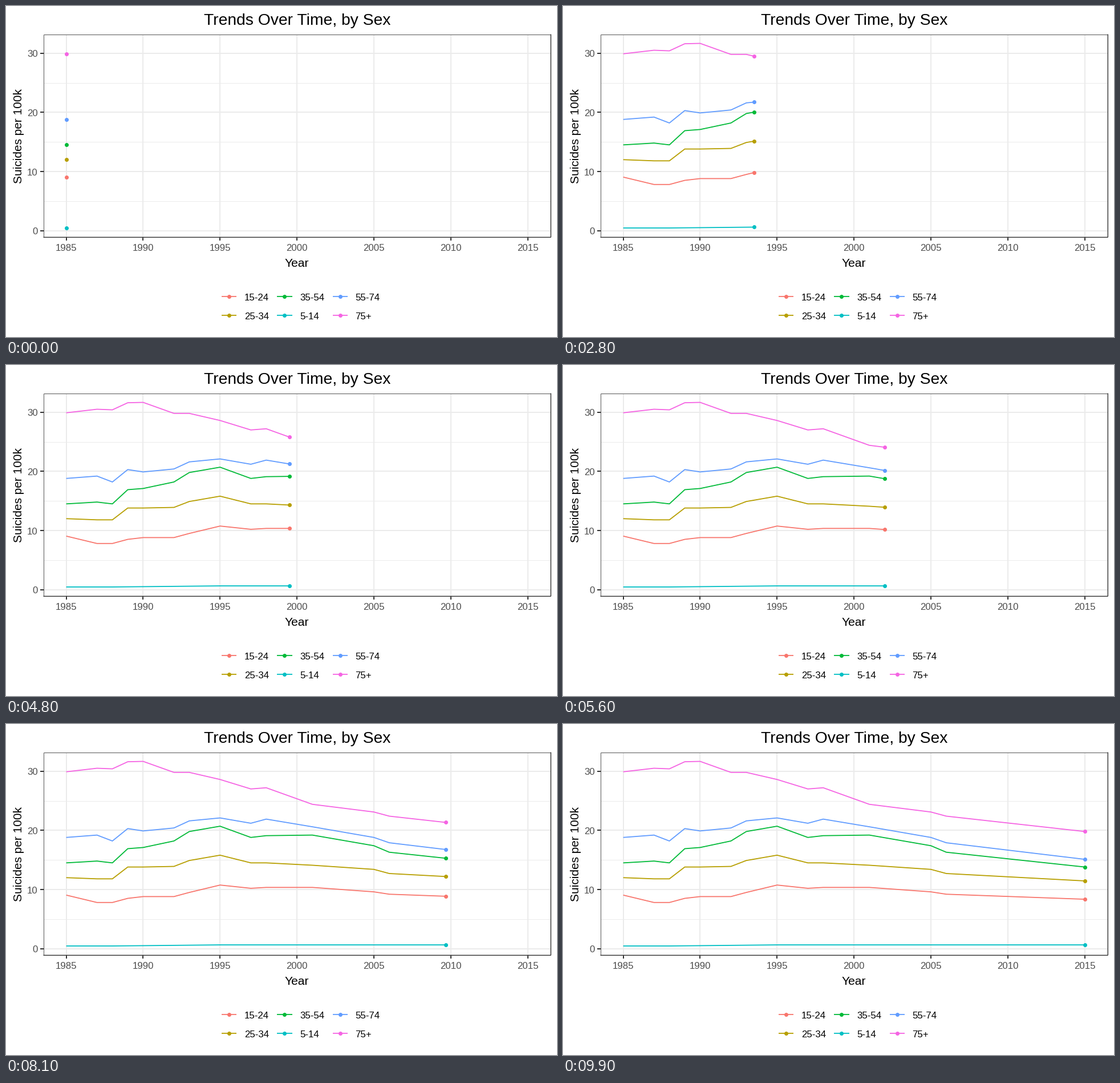
These frames come from a looping animation (966 px wide and 580 px high, 10 s). A matplotlib script:

```python
import numpy as np
import matplotlib.pyplot as plt
from matplotlib.animation import FuncAnimation

W, H, DPI = 966, 580, 100
FRAMES, INTERVAL = 100, 100
PX = 72 / DPI  # points per pixel
INK, TICK, GRID = "#000000", "#4D4D4D", "#EBEBEB"
DARK, PALE = "#333333", "#555555"
LEFT, RIGHT, TOP, BOTTOM = 65.5, 955.3, 49.5, 405.3

plt.rcParams["font.family"] = "Liberation Sans"

years = np.arange(31)
# Each year lands on a whole frame; positions between are linear.
year_frames = np.round(years * (FRAMES - 1) / 30)

# Turning points shared by the age groups, in years since 1985
turns = [0, 2, 3, 4, 5, 7, 8, 10, 12, 13, 16, 20, 21, 30]
groups = [
    ("15-24", "#F8766D",
     [9.05, 7.8, 7.8, 8.5, 8.8, 8.8, 9.5, 10.75, 10.2, 10.35, 10.35, 9.6, 9.2, 8.35]),
    ("25-34", "#B79F00",
     [12, 11.8, 11.8, 13.8, 13.8, 13.9, 14.9, 15.8, 14.5, 14.5, 14.1, 13.4, 12.7, 11.45]),
    ("35-54", "#00BA38",
     [14.5, 14.8, 14.5, 16.9, 17.1, 18.2, 19.8, 20.7, 18.8, 19.1, 19.2, 17.4, 16.3, 13.8]),
    ("5-14", "#00BFC4", np.interp(turns, [3, 10], [.45, .63])),
    ("55-74", "#619CFF",
     [18.8, 19.2, 18.2, 20.3, 19.9, 20.4, 21.6, 22.1, 21.2, 21.9, 20.6, 18.8, 17.9, 15.1]),
    ("75+", "#F564E3",
     [29.9, 30.5, 30.4, 31.6, 31.66, 29.8, 29.8, 28.6, 27, 27.2, 24.4, 23.1, 22.4, 19.8]),
]


def sx(year):
    return 105.6 + 26.97 * year


def sy(value):
    return 393.6 - 10.363 * np.asarray(value)


fig = plt.figure(figsize=(W / DPI, H / DPI), dpi=DPI, facecolor="white")
ax = fig.add_axes([0, 0, 1, 1])
ax.set_xlim(0, W)
ax.set_ylim(H, 0)
ax.axis("off")


def line(x, y, color, width, z=1, **kw):
    return ax.plot(x, y, color=color, lw=width * PX, zorder=z,
                   solid_capstyle="butt", **kw)[0]


def dot(x, y, color):
    return ax.plot(x, y, "o", color=color, ms=7 * PX, mew=0, zorder=4,
                   snap=False)[0]


def label(x, y, text, size, color=INK, ha="center", **kw):
    ax.text(x, y, text, fontsize=size * PX, color=color, ha=ha,
            va="baseline", **kw)


# Grid, ticks and tick labels
for v in (5, 15, 25):
    line([LEFT, RIGHT], [sy(v)] * 2, GRID, 1)
for v in (0, 10, 20, 30):
    line([LEFT, RIGHT], [sy(v)] * 2, GRID, 2)
    line([60, LEFT], [sy(v)] * 2, DARK, 2)
    label(56, sy(v) + 6.7, str(v), 16.8, TICK, ha="right")
for v in range(0, 31, 5):
    line([sx(v)] * 2, [TOP, BOTTOM], GRID, 2)
    line([sx(v)] * 2, [BOTTOM, 411], DARK, 2)
    label(sx(v), 429, str(1985 + v), 16.8, TICK)

# Panel border, heavier on the right and at the bottom
line([LEFT, LEFT], [TOP, BOTTOM], PALE, 1, 5)
line([LEFT, RIGHT], [TOP, TOP], PALE, 1, 5)
line([RIGHT, RIGHT], [TOP, BOTTOM], DARK, 1.4, 5, snap=False)
line([LEFT, RIGHT], [BOTTOM, BOTTOM], DARK, 1.4, 5, snap=False)

label(510.2, 33, "Trends Over Time, by Sex", 28.3)
label(510.2, 457, "Year", 21)
label(28, 227.5, "Suicides per 100k", 20.9, rotation=90,
      rotation_mode="anchor")

# Legend, filled column by column
for i, (name, color, _) in enumerate(groups):
    col, row = divmod(i, 2)
    x, y = 391 + 97.4 * col, 509 + 33 * row
    line([x - 13.3, x + 13.3], [y, y], color, 1.8)
    dot([x], [y], color)
    label(x + 26.7, y + 7, name, 16.8, ha="left")

curves = [line([], [], color, 1.8, 3, snap=False) for _, color, _ in groups]
heads = [dot([], [], color) for _, color, _ in groups]


def draw(frame):
    now = np.interp(frame, year_frames, years)
    t = np.append(years[years < now], now)
    for (_, _, levels), curve, head in zip(groups, curves, heads):
        x, y = sx(t), sy(np.interp(t, turns, levels))
        curve.set_data(x, y)
        head.set_data(x[-1:], y[-1:])
    return curves + heads


anim = FuncAnimation(fig, draw, frames=FRAMES, interval=INTERVAL,
                     repeat=True, repeat_delay=0, blit=False)
plt.show()
```
